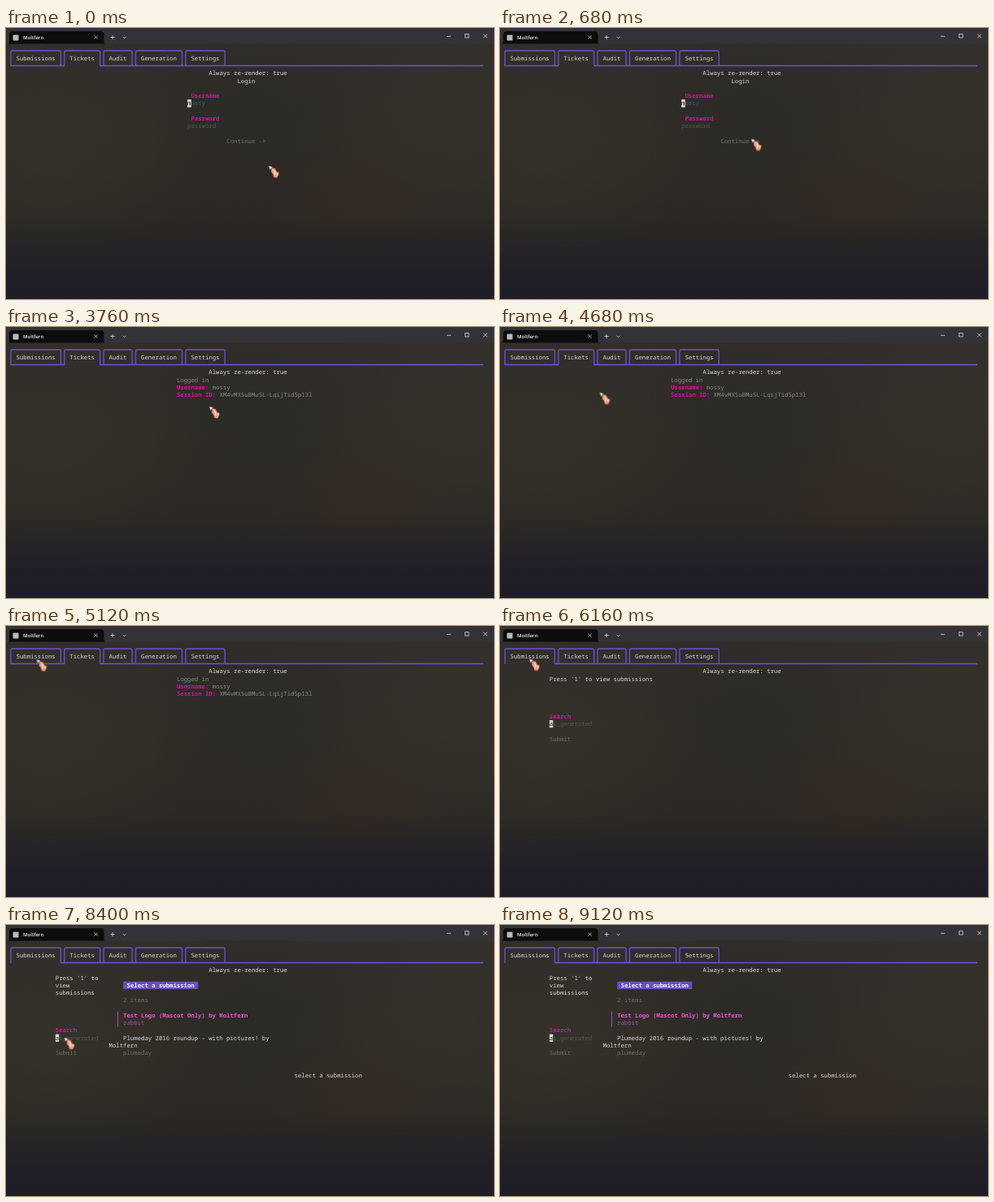
An HTML page for the animation above (9.32 s loop, 600 by 334 pixels).

```html
<!DOCTYPE html>
<html lang="en">
<head>
<meta charset="utf-8">
<title>Terminal session</title>
<style>
html, body { margin: 0; width: 100%; height: 100%; overflow: hidden; }
body {
  background:
    linear-gradient(transparent 70%, #201f27 90%, #1f1e26),
    radial-gradient(ellipse 110px 70px at 435px 215px, #3a2a2288, transparent),
    radial-gradient(ellipse 190px 150px at 50px 150px, #37352a99, transparent),
    radial-gradient(ellipse 150px 120px at 300px 110px, #29282399, transparent),
    radial-gradient(ellipse 170px 170px at 560px 110px, #39342c99, transparent),
    linear-gradient(#312e2c, #302d27 40%, #2b2824 75%);
}
svg { display: block; width: 600px; height: 334px; }
text { text-rendering: geometricPrecision; white-space: pre; }
#screen text { font: 7.31px "Noto Sans Mono", monospace; fill: #d9d8d5; }
#screen .label { fill: #d90fa1; font-weight: 600; }
#screen .soft { fill: #8b8985; }
#screen .dim { fill: #72706b; }
#screen .faint { fill: #595752; }
#screen .under { fill: #24221f; }
#screen .heading { fill: #f4f0ff; font-weight: 600; }
#screen .chosen { fill: #e756d4; font-weight: 600; }
#screen .tag { fill: #a94fae; }
.block { fill: #d9d8d5; }
.line { fill: none; stroke: #7050d0; stroke-width: 1.3; }
.glyph { fill: none; stroke: #dedee0; stroke-width: .8; }

/* Scene switches */
#login, #account, #search, #results, #onTickets, #onSubmissions,
#hint, #typed, #caret, #passCaret, #pointer, #pointer g {
  animation: 9320ms step-end infinite;
}
#login { animation-name: login; }
#account { animation-name: account; }
#search { animation-name: search; }
#results { animation-name: results; }
#onTickets { animation-name: onTickets; }
#onSubmissions { animation-name: onSubmissions; }
#hint { animation-name: hint; }
#typed { animation-name: typed; }
#caret { animation-name: caret; }
#passCaret { animation-name: passCaret; }
@keyframes login { 0% { display: inline; } 34.335%, 100% { display: none; } }
@keyframes account { 0% { display: none; } 34.335% { display: inline; } 57.511%, 100% { display: none; } }
@keyframes search { 0% { display: none; } 57.511% { display: inline; } 78.112%, 100% { display: none; } }
@keyframes results { 0% { display: none; } 78.112%, 100% { display: inline; } }
@keyframes onTickets { 0% { display: inline; } 57.511%, 100% { display: none; } }
@keyframes onSubmissions { 0% { display: none; } 57.511%, 100% { display: inline; } }

/* Typing the user name, then moving on to the password */
@keyframes hint { 0% { display: inline; } 14.592%, 100% { display: none; } }
@keyframes typed {
  0% { clip-path: inset(0 100% 0 0); }
  14.592% { clip-path: inset(0 80% 0 0); }
  15.451% { clip-path: inset(0 60% 0 0); }
  16.309% { clip-path: inset(0 40% 0 0); }
  17.167% { clip-path: inset(0 20% 0 0); }
  18.026%, 100% { clip-path: inset(0); }
}
@keyframes caret {
  0% { transform: none; display: inline; }
  14.592% { transform: translateX(4.385px); }
  15.451% { transform: translateX(8.77px); }
  16.309% { transform: translateX(13.155px); }
  17.167% { transform: translateX(17.54px); }
  18.026% { transform: translateX(21.925px); display: inline; }
  21.459%, 100% { transform: translateX(21.925px); display: none; }
}
@keyframes passCaret { 0% { display: none; } 21.459%, 100% { display: inline; } }

#pointer { animation-name: travel; animation-timing-function: linear; }
#pointer g { animation-name: presence; }
@keyframes presence {
  0% { visibility: visible; }
  14.592% { visibility: hidden; }
  40.343%, 100% { visibility: visible; }
}
@keyframes travel {
  0% { transform: translate(323px, 170px); }
  10.3% { transform: translate(303px, 123px); animation-timing-function: ease-out; }
  14.163% { transform: translate(232px, 94px); animation-timing-function: step-end; }
  40.343% { transform: translate(250px, 98px); animation-timing-function: ease-out; }
  42.489% { transform: translate(236px, 98px); }
  47.21% { transform: translate(236px, 98px); animation-timing-function: cubic-bezier(.4, 0, .8, .8); }
  50.215% { transform: translate(123px, 81px); animation-timing-function: cubic-bezier(.15, .45, .5, 1); }
  55.794% { transform: translate(36px, 40.5px); }
  66.094% { transform: translate(36px, 40.5px); animation-timing-function: cubic-bezier(.4, 0, .7, .9); }
  74.678% { transform: translate(71px, 130px); animation-timing-function: ease-out; }
  75.966% { transform: translate(72px, 137px); }
  89.7% { transform: translate(72px, 137px); animation-timing-function: ease-in-out; }
  96.137%, 100% { transform: translate(25px, 336px); }
}
</style>
</head>
<body>
<svg viewBox="0 0 600 334">
  <rect width="600" height="19.5" fill="#333236"/>
  <path d="M2 19.5q2 0 2-2V8q0-4 4-4H116.500q4 0 4 4v9.500q0 2 2 2z" fill="#0c0c0d"/>
  <rect x="8.500" y="8.500" width="7" height="7" rx="1" fill="#b9b9bc"/>
  <text x="21" y="14.200" font-family="Open Sans, sans-serif" font-size="6" font-weight="600" fill="#f2f2f2">Moltfern</text>
  <path class="glyph" d="M108.500 9.500l4 4m0-4l-4 4M128.500 11.500h5m-2.500-2.500v5M143.500 10.800l2 2 2-2M542 10.300h5M564.500 7.500h4.500v4.500h-4.500zM587 7.500l4.800 4.800m0-4.800l-4.800 4.800"/>

  <g id="screen">
    <g id="tabs"></g>
    <path id="onTickets" class="line" d="M5.500 46.500H72M115.600 46.500H587"/>
    <path id="onSubmissions" class="line" d="M67.400 46.500H587"/>
    <g id="login">
      <g id="hint"></g>
      <g id="typed"></g>
      <g id="caret"></g>
      <g id="passCaret"></g>
    </g>
    <g id="account"></g>
    <g id="search"></g>
    <g id="results"></g>
  </g>

  <g id="pointer"><g>
    <path d="M3 2l5 1 2 4 3 1-1 4-2 3-4-1-1-4-2-2z" fill="#e9a184" stroke="#5a2f2c" stroke-width=".7"/>
    <path d="M6 5l2 3-1 3M10 9l1 2" fill="none" stroke="#fbe6da" stroke-width="1.300"/>
    <path d="M0 0l4.500 1.200L1.600 4.800z" fill="#fff" stroke="#6d5069" stroke-width=".5"/>
  </g></g>
</svg>
<script>
const CELL = 4.385, ROW = 9.27;
const cellX = col => 3.8 + col * CELL;
const rowY = row => 28 + row * ROW;

function add(parent, tag, attrs, content = '') {
  const node = document.createElementNS('http://www.w3.org/2000/svg', tag);
  for (const key in attrs) node.setAttribute(key, attrs[key]);
  node.textContent = content;
  const group = document.getElementById(parent);
  group.append(node);
}
const write = (parent, col, row, content, style = '') =>
  add(parent, 'text', { x: cellX(col), y: rowY(row) + 2.5, class: style }, content);
const fillCells = (parent, col, row, count, attrs) =>
  add(parent, 'rect', { x: cellX(col), y: rowY(row) - ROW / 2, width: CELL * count, height: ROW, ...attrs });
const block = (parent, col, row) => fillCells(parent, col, row, 1, { class: 'block' });

let start = 0;
for (const name of ['Submissions', 'Tickets', 'Audit', 'Generation', 'Settings']) {
  const end = start + name.length + 3;
  const left = cellX(start + .5), right = cellX(end + .5);
  add('tabs', 'path', {
    class: 'line',
    d: `M${left} 47V30q0-2 2-2H${right - 2}q2 0 2 2V47`
  });
  write('tabs', start + 2, 1, name);
  start = end + 1;
}
write('tabs', 56, 3, 'Always re-render: true');

const user = 'mossy';
write('login', 64, 4, 'Login');
write('login', 51, 6, 'Username', 'label');
write('login', 51, 9, 'Password', 'label');
write('login', 50, 10, 'password', 'faint');
write('login', 61, 12, 'Continue ->', 'dim');
write('hint', 50, 7, user, 'faint');
write('typed', 50, 7, user);
block('caret', 50, 7);
block('passCaret', 50, 10);
write('passCaret', 50, 10, 'p', 'under');

// The first hint letter sits inside the block until typing starts
const login = document.getElementById('login');
login.append(document.getElementById('caret'), document.getElementById('hint'));
block('hint', 50, 7);
write('hint', 50, 7, user[0], 'under');

write('account', 47, 4, 'Logged in', 'soft');
write('account', 47, 5, 'Username:', 'label');
write('account', 57, 5, user, 'soft');
write('account', 47, 6, 'Session ID:', 'label');
write('account', 59, 6, 'XM4vMXSuBMuSL-LqijTid5p13l', 'soft');

function searchForm(parent, row) {
  write(parent, 13, row, 'Search', 'label');
  write(parent, 14, row + 1, 'i_generated', 'faint');
  block(parent, 13, row + 1);
  write(parent, 13, row + 1, 'a', 'under');
  write(parent, 13, row + 3, 'Submit', 'dim');
}
write('search', 13, 4, "Press '1' to view submissions");
searchForm('search', 9);

["Press '1' to", 'view', 'submissions'].forEach((line, i) => write('results', 13, 4 + i, line));
searchForm('results', 11);
fillCells('results', 32, 5, 21, { fill: '#6750bd' });
write('results', 33, 5, 'Select a submission', 'heading');
write('results', 32, 7, '2 items', 'dim');
add('results', 'path', {
  d: `M${cellX(30.5)} ${rowY(8.5)}V${rowY(10.5)}`, stroke: '#a94fae', 'stroke-width': 1
});
write('results', 32, 9, 'Test Logo (Mascot Only) by Moltfern', 'chosen');
write('results', 32, 10, 'rabbit', 'tag');
write('results', 32, 12, 'Plumeday 2016 roundup - with pictures! by');
write('results', 28, 13, 'Moltfern');
write('results', 32, 14, 'plumeday', 'dim');
write('results', 80, 17, 'select a submission');
</script>
</body>
</html>
```
